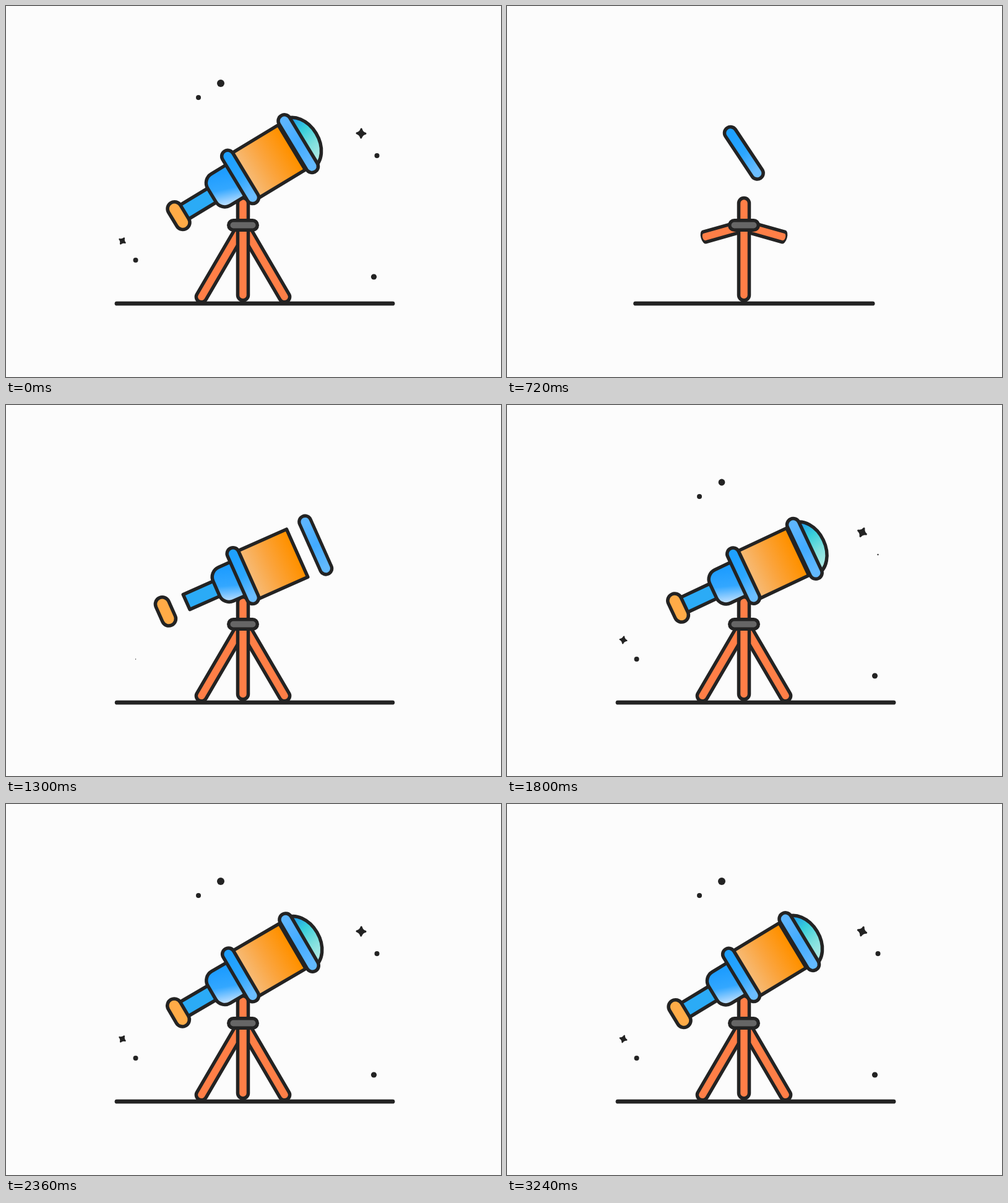
An HTML page with a canvas for the animation above (3260 ms loop, 800 px wide and 600 px high).

```html
<!DOCTYPE html>
<html lang="en">
<head>
<meta charset="utf-8">
<title>Telescope</title>
<style>
  html, body { margin: 0; width: 100%; height: 100%; overflow: hidden; background: #fcfcfc; }
  canvas { display: block; }
</style>
</head>
<body>
<canvas id="stage" width="800" height="600"></canvas>
<script>
const ctx = document.getElementById('stage').getContext('2d');
const LOOP = 3260, INK = '#232323', LINE = 5.5, AXIS = -29;
const rad = deg => deg * Math.PI / 180;
const mix = (a, b, p) => a + (b - a) * p;
const span = (t, from, to) => Math.min(1, Math.max(0, (t - from) / (to - from)));
const out = (p, power = 3) => 1 - Math.pow(1 - p, power);
const swing = p => (1 - Math.cos(Math.PI * p)) / 2;

function gradient(x1, y1, x2, y2, ...colors) {
  const g = ctx.createLinearGradient(x1, y1, x2, y2);
  colors.forEach((c, i) => g.addColorStop(i / (colors.length - 1), c));
  return g;
}

const blueRear = gradient(-6, -34, 8, 34, '#1ea0ff', '#2ba6ff', '#6cbdff');
const blueFront = gradient(-8, -38, 8, 38, '#5cb5ff', '#42abff', '#62b9ff');
const barrelFill = gradient(20, 0, 104, 0, '#f6bd7c', '#fba43d', '#ff9100');
const coneFill = gradient(-6, -52, -24, 0, '#1e9dff', '#33a7ff', '#c6e3ff');
const domeFill = gradient(132, -70, 148, 10, '#1e96ee', '#38cfda', '#7fe0de', '#b4ebe6');

// Draws at a local origin with its own turn and size.
function place(x, y, turn, sx, sy, draw) {
  if (sx <= 0 || sy <= 0) return;
  ctx.save();
  ctx.translate(x, y);
  ctx.rotate(rad(turn));
  ctx.scale(sx, sy);
  draw();
  ctx.restore();
}

function segment(x1, y1, x2, y2, width, color) {
  ctx.beginPath();
  ctx.moveTo(x1, y1);
  ctx.lineTo(x2, y2);
  ctx.lineWidth = width;
  ctx.strokeStyle = color;
  ctx.stroke();
}

function capsule(x1, y1, x2, y2, width, fill) {
  segment(x1, y1, x2, y2, width, INK);
  segment(x1, y1, x2, y2, width - 2 * LINE, fill);
}

function outline(fill) {
  ctx.fillStyle = fill;
  ctx.fill();
  ctx.lineWidth = LINE;
  ctx.strokeStyle = INK;
  ctx.stroke();
}

function box(left, top, right, bottom, radii, fill) {
  ctx.beginPath();
  ctx.roundRect(left, top, right - left, bottom - top, radii);
  outline(fill);
}

function tripod(t) {
  const angle = mix(100, 30.3, out(span(t, 627, 1285)));
  const length = out(span(t, 630, 940), 2);
  for (const side of [-1, 1])
    place(383, 355.5, -side * angle, 1, length, () => capsule(0, 0, 0, 133, 22.5, '#ff7f47'));

  const rise = out(span(t, 80, 520));
  if (rise > 0) capsule(383, mix(467, 319, rise), 383, 467.5, 22.5, '#ff7f47');
  const clamp = out(span(t, 400, 620));
  place(383, 354.5, 0, clamp, clamp, () => capsule(-15.5, 0, 15.5, 0, 21, '#666'));
}

function scope(t) {
  const tilt = mix(24, 31.2, swing(span(t, 1500, 2620)));
  const settle = swing(span(t, 1300, 1620));
  const lift = t < 700
    ? mix(30, -39, out(span(t, 440, 700), 2))
    : mix(-39, 0, swing(span(t, 700, 960)));
  const extraTurn = 22 * (1 - swing(span(t, 440, 960)));

  place(383, 310 + lift, -tilt, 1, 1, () => {
    const coneLeft = mix(10, -41, out(span(t, 965, 1662)));
    if (t > 1006) box(mix(10, -95, out(span(t, 1006, 1519))), -42.5, coneLeft + 1, -16, 0, '#2babf6');
    if (t > 990) box(coneLeft, -59.5, 5, 0, [17, 0, 0, 17], coneFill);
    if (t > 993) box(13, -71, mix(14, 109.5, out(span(t, 993, 1380))), 13.5, 0, barrelFill);

    const bulge = out(span(t, 1440, 1740));
    if (bulge > 0) {
      ctx.beginPath();
      ctx.ellipse(122, -28, 33 * bulge, 45.5, 0, -Math.PI / 2, Math.PI / 2);
      ctx.closePath();
      outline(domeFill);
    }

    const rear = out(span(t, 440, 600));
    place(13.6, -31, -extraTurn, rear, rear, () => capsule(0, -39, 0, 39, 25, blueRear));

    const front = out(span(t, 964, 1384), 2);
    const frontX = mix(mix(60, 141, out(span(t, 1000, 1260), 2)), 121.6, settle);
    place(frontX, AXIS + 0.5, 0, front, front, () => capsule(0, -43, 0, 43, 25.5, blueFront));

    const eye = out(span(t, 900, 1020));
    const eyeX = mix(mix(-40, -124, out(span(t, 910, 1240), 2)), -104, settle);
    place(eyeX, AXIS, 0, eye, eye, () => capsule(0, -13, 0, 13, 28, '#ffab47'));
  });
}

function star(x, y, size, turn) {
  place(x, y, turn, size, size, () => {
    ctx.beginPath();
    ctx.moveTo(0, -7);
    for (let i = 0; i < 4; i++) {
      const a = rad(90 * i - 45), b = rad(90 * i);
      ctx.quadraticCurveTo(2.2 * Math.cos(a), 2.2 * Math.sin(a), 7 * Math.cos(b), 7 * Math.sin(b));
    }
    ctx.closePath();
    ctx.fillStyle = ctx.strokeStyle = INK;
    ctx.lineWidth = 3;
    ctx.fill();
    ctx.stroke();
  });
}

// x, y, radius, start time
const dots = [
  [347, 125, 6, 1530], [311, 148, 4, 1400], [599.5, 242, 4, 1740],
  [594.5, 438, 4.6, 1450], [209.5, 411, 4, 1265]
];

function sky(t, spinTime) {
  ctx.fillStyle = INK;
  for (const [x, y, r, start] of dots) {
    ctx.beginPath();
    ctx.arc(x, y, r * out(span(t, start, start + 400), 2), 0, 7);
    ctx.fill();
  }
  const spin = 0.12 * (spinTime - 1800);
  star(574, 206, out(span(t, 1450, 1780)), 25 + spin);
  star(188, 380, 0.78 * out(span(t, 1400, 1730)), 10 - spin);
}

function draw(now) {
  const time = now % LOOP;
  const opening = time < 20;           // the loop opens on the finished pose
  const t = opening ? LOOP : time;

  ctx.fillStyle = '#fcfcfc';
  ctx.fillRect(0, 0, 800, 600);
  ctx.lineCap = ctx.lineJoin = 'round';
  tripod(t);
  const ground = out(span(t, 20, 1420), 2.83);
  segment(383 - 204 * ground, 481.2, 383 + 242 * ground, 481.2, 6.8, INK);
  scope(t);
  sky(t, opening ? 2360 : t);
}

const begin = performance.now();
function frame() {
  draw(performance.now() - begin);
  requestAnimationFrame(frame);
}
frame();
</script>
</body>
</html>
```
